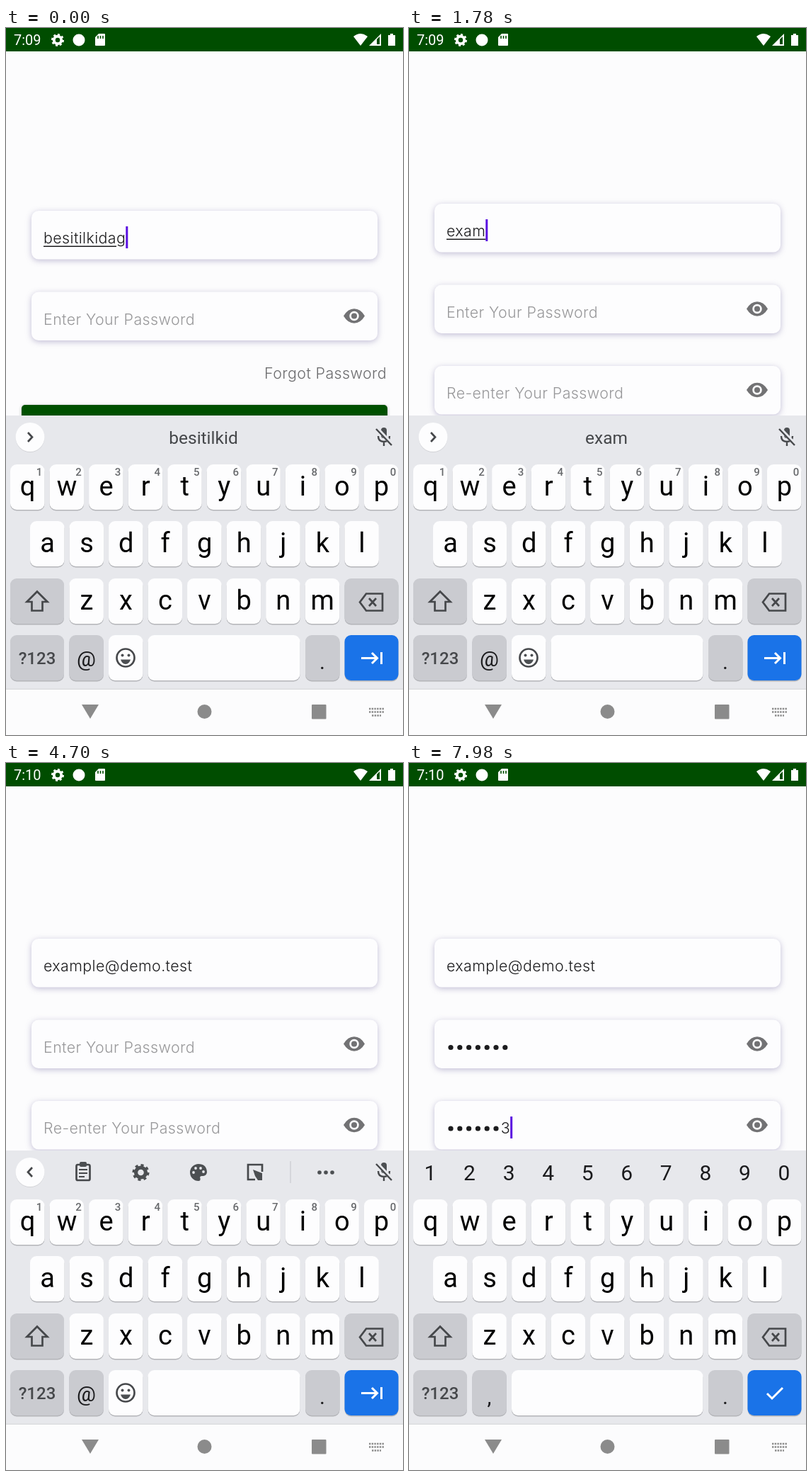
Write an HTML page that moves like this. It is 561 by 998 pixels and loops after 8000 ms.

```html
<!DOCTYPE html>
<html lang="en">
<head>
<meta charset="utf-8">
<title>Sign up form</title>
<style>
  html, body { margin: 0; width: 100%; height: 100%; overflow: hidden; background: #fcfcfd; }
  svg { display: block; width: 100vw; height: 100vh; }
  text { white-space: pre; }
  .body { font: 350 21.4px Inter, sans-serif; letter-spacing: .4px; fill: #6c6c6e; }
  .hint { fill: #98989a; }
  .typed { fill: #1c1c1e; }
  .link { font: 600 21.8px Inter, sans-serif; fill: #004d00; }
  .label { font: 400 19.1px Inter, sans-serif; letter-spacing: 1.7px; fill: #fff; }
  .mid { text-anchor: middle; }
  .end { text-anchor: end; }
  .field { fill: #fdfdfe; filter: drop-shadow(0 2px 4px rgba(70, 60, 130, .32)); }
  .button { fill: #005000; filter: drop-shadow(0 1px 2px rgba(0, 0, 0, .3)); }
  .status { font: 400 20px Roboto, sans-serif; fill: #fff; }
  #board text { font-family: Roboto, sans-serif; text-anchor: middle; }
  .letter { font-size: 38px; }
  .corner { font-size: 15px; font-weight: 500; fill: #66686b; }
  .digit { font-size: 30px; fill: #1b1b1d; }
  .word { font-size: 24.5px; fill: #45474a; }
  .mode { font-size: 24px; font-weight: 500; fill: #46484b; }
  .line { fill: none; stroke: #46484b; stroke-width: 2.7; }
  .white { stroke: #fff; stroke-width: 3; }
  .ink { fill: #4c4f52; }
</style>
</head>
<body>
<svg id="stage" viewBox="0 0 561 998" preserveAspectRatio="none"></svg>
<script>
const LOOP = 8000, CUT = 100, SIGN_UP = 620, FOCUS = 1100, RISE = 1140, RISE_TIME = 285;
const MINUTE = 3600, PASS = 5000, REPEAT = 6850;
const TEXT_X = 53, DOT_PITCH = 12.8, BOARD_H = 386;
const USER = 'besitilkidag', NAME = 'example', HOST = '@demo.test', SECRET = 'pass123';

const text = (x, y, cls, s, id = '') =>
  `<text x="${x}" y="${y}" class="${cls}"${id && ` id="${id}"`}>${s}</text>`;
const rect = (x, y, w, h, r, attrs) =>
  `<rect x="${x}" y="${y}" width="${w}" height="${h}" rx="${r}" ${attrs}/>`;
const circle = (x, y, r, attrs) => `<circle cx="${x}" cy="${y}" r="${r}" ${attrs}/>`;
const path = (d, attrs) => `<path d="${d}" ${attrs}/>`;

function gear(x, y, r, color) {
  const ring = (k, w, extra) =>
    circle(x, y, r * k, `fill="none" stroke="${color}" stroke-width="${r * w}" ${extra}`);
  return ring(.58, .44, '') + ring(.85, .3, 'pathLength="16" stroke-dasharray="1 1"');
}

const eye = (x, y) => path(`M${x - 15} ${y}Q${x - 9} ${y - 10.2} ${x} ${y - 10.2}T${x + 15} ${y}Q${x + 9} ${y + 10.2} ${x} ${y + 10.2}T${x - 15} ${y}Z`, 'fill="#727274"')
  + circle(x, y, 5.4, 'fill="#727274" stroke="#fdfdfe" stroke-width="2.7"');

const field = (y, hint, id, secret) =>
  rect(36, y, 489, 68.5, 10, 'class="field"')
  + text(TEXT_X, y + 46, 'body hint', hint, id + 'Hint')
  + `<g id="${id}Dots"></g>` + text(TEXT_X, y + 46, 'body typed', '', id)
  + (secret ? eye(492, y + 34) : '');

const button = (y, label) =>
  rect(22, y, 517, 50, 5, 'class="button"') + text(281, y + 32.5, 'label mid', label);

const login = `<g id="login">
  ${field(258, 'Enter Your Email', 'user')}
  ${field(372.5, 'Enter Your Password', 'loginPass', true)}
  ${text(538, 495, 'body end', 'Forgot Password')}
  ${button(532, 'Sign In')}
  ${text(280.5, 656, 'body mid', 'Not Registered Yet?')}
  ${text(280.5, 698, 'link mid', 'Sign Up')}</g>`;

const register = `<g id="register">
  ${field(248, 'Enter Your Email', 'email')}
  ${field(362.5, 'Enter Your Password', 'pass', true)}
  ${field(477, 'Re-enter Your Password', 'repeat', true)}
  ${button(583.5, 'Sign Up')}
  ${text(280.5, 687, 'body mid', 'Already Registered?')}
  ${text(280.5, 729, 'link mid', 'Sign In')}</g>`;

const statusBar = rect(0, 0, 561, 33, 0, 'fill="#004d00"')
  + text(11, 24, 'status', '7:09', 'clock')
  + gear(73, 17, 9, '#fff') + circle(103, 17, 8.5, 'fill="#fff"')
  + path('M131 8H139Q140 8 140 9V24Q140 25 139 25H127Q126 25 126 24V13Z', 'fill="#fff"')
  + path('M130 11V15M133.5 11V15M137 11V15', 'stroke="#004d00" stroke-width="1.6"')
  + path('M491 12Q501 4 511 12L501 25Z', 'fill="#fff"')
  + path('M513 25L530 8V25Z', 'fill="#fff"')
  + path('M524 23V16L528 12V23Z', 'fill="#004d00"')
  + path('M540 10H543V8H547V10H550V25H540Z', 'fill="#fff"');

const key = (x, y, w, color = '#fdfdfe') =>
  rect(x, y + 1.5, w, 64, 9, 'fill="#b4b5b9"') + rect(x, y, w, 64, 9, `fill="${color}"`);
const GREY = '#cacbd0', STEP = 55.55, KEY_W = 48.5;

const row = (letters, x, y) => [...letters].map((c, i) =>
  key(x + STEP * i, y, KEY_W) + text(x + STEP * i + 24.5, y + 43.5, 'letter', c)).join('');
const digits = (cls, x, y) => [...'1234567890'].map((c, i) =>
  text(x + STEP * i, y, cls, c)).join('');

const tools = path('M37 571L31 577.5L37 584', 'class="line"')
  + rect(99.5, 567, 19, 22, 2, 'class="line"') + rect(104, 563, 10, 7, 2, 'class="ink"')
  + path('M103 574H115M103 579H115M103 584H111', 'class="line" style="stroke-width:2"')
  + gear(190.5, 578, 12, '#4c4f52')
  + path('M272 566A12 12 0 1 0 272 590Q275 590 274.500 586.500Q273 583 277 583H279Q284 582 284 577Q283 566 272 566Z', 'class="ink"')
  + [[265, 578], [268, 572], [275, 572], [279, 577]].map(p => circle(...p, 1.9, 'fill="#e7e8ec"')).join('')
  + path('M352 588H342V567H362V577', 'class="line"')
  + path('M349 574L362 579V589H356L352 583Z', 'class="ink"')
  + path('M402 562V593', 'stroke="#cfd0d6" stroke-width="1.5"')
  + [443, 452, 461].map(x => circle(x, 578, 2.8, 'class="ink"')).join('');

const mic = rect(530, 564, 8, 15, 4, 'class="ink"')
  + path('M526 576Q526 584 534 584T542 576M534 584V590', 'class="line" style="stroke-width:2.4"')
  + path('M524 565L546 588', 'stroke="#e7e8ec" stroke-width="5"')
  + path('M523 566L545 589', 'class="line" style="stroke-width:2.4"');

const board = `<g id="board">
  ${rect(0, 547, 561, 840, 0, 'fill="#e7e8ec"')}
  ${rect(0, 933, 561, 460, 0, 'fill="#fcfcfd"')}
  ${rect(0, 932.500, 561, 1.5, 0, 'fill="#dcdde0"')}
  <g id="strip">${circle(34, 578.5, 20.5, 'fill="#d3d4d8"')}${circle(34, 577.5, 20.5, 'fill="#fdfdfe"')}${mic}
    <g id="tools">${tools}</g>
    <g id="suggest">${path('M31 571L37 577.5L31 584', 'class="line"')}${text(279, 587, 'word', '', 'word')}</g></g>
  ${row('qwertyuiop', 6, 616)}${row('asdfghjkl', 34, 696)}${row('zxcvbnm', 89.4, 777)}
  ${key(6, 777, 76, GREY)}${path('M44 795.5L58.500 810H51.500V822.500H36.500V810H29.500Z', 'class="line"')}
  ${key(478.5, 777, 76, GREY)}${path('M509 798.500H532V822.500H509L500 810.500Z M513 805L523 816M523 805L513 816', 'class="line"')}
  ${key(6, 857, 76, GREY)}${text(44, 898, 'mode', '?123')}
  ${key(89.4, 857, KEY_W, GREY)}${key(423, 857, KEY_W, GREY)}${text(447, 905, 'digit', '.')}
  ${key(478.5, 857, 76, '#1a73e8')}
  ${path('M502 889.500H524M517 882L524.500 889.500L517 897M530.500 881V898', 'class="line white" id="next"')}
  ${path('M506 890L513 897L528 882', 'class="line white" id="done"')}
  <g id="mailKeys">${digits('corner', 47, 632)}${text(113.5, 901, 'digit', '@')}
    ${key(145, 857, KEY_W)}${circle(169, 889, 12.5, 'class="line"')}
    ${circle(164.5, 885.5, 2, 'class="ink"')}${circle(173.5, 885.5, 2, 'class="ink"')}
    ${path('M162 891.500H176Q174 898 169 898T162 891.500Z', 'class="ink"')}
    ${key(200.5, 857, 215)}</g>
  <g id="passKeys">${digits('digit', 30, 589)}${text(113.5, 905, 'digit', ',')}${key(145, 857, 270.5)}</g>
</g>`;

const navIcons = `<g id="nav">
  <path id="back" d="M107 965L127 953V977Z"/>
  ${circle(280.5, 965, 10, '')}${rect(432, 955, 20.5, 20.5, 1, '')}
  <path id="switcher" d="M513 961H534M513 965.500H534M517 970.500H530" fill="none" stroke-width="2.4" stroke-dasharray="2.4 1.300"/></g>`;

document.getElementById('stage').innerHTML = rect(0, 0, 561, 998, 0, 'fill="#fcfcfd"')
  + login + register + rect(0, 0, 3, 31, 0, 'id="cursor" fill="#5a10e0"')
  + rect(0, 0, 0, 1.5, 0, 'id="underline" fill="#1c1c1e"')
  + rect(0, 933, 561, 65, 0, 'fill="#000"') + board + navIcons + statusBar;

const el = id => document.getElementById(id);
const show = (id, on) => { el(id).style.display = on ? '' : 'none'; };
const put = (id, s) => { if (el(id).textContent !== s) el(id).textContent = s; };
const clamp = v => Math.min(1, Math.max(0, v));
const set = (id, attrs) => { for (const k in attrs) el(id).setAttribute(k, attrs[k]); };

// Cubic bezier (.4, 0, .2, 1), solved by bisection.
function ease(x) {
  let lo = 0, hi = 1;
  for (let i = 0; i < 20; i++) {
    const s = (lo + hi) / 2, r = 1 - s;
    if (1.2 * r * r * s + .6 * r * s * s + s * s * s < x) lo = s; else hi = s;
  }
  return lo * lo * (3 - 2 * lo);
}

function typing(t, s, start, step) {
  const n = Math.min(s.length, Math.max(0, Math.floor((t - start) / step) + 1));
  return { n, value: s.slice(0, n), last: n ? start + (n - 1) * step : 0 };
}

const widthOf = id => el(id).textContent ? el(id).getComputedTextLength() : 0;

function plain(id, value) {
  put(id, value);
  show(id + 'Hint', !value);
  return TEXT_X + widthOf(id);
}

function masked(id, y, state, t, focused) {
  const open = focused && state.n > 0 && t - state.last < 1500;
  const dots = state.n - (open ? 1 : 0);
  const x = TEXT_X + DOT_PITCH * dots;
  el(id + 'Dots').innerHTML = Array.from({ length: dots }, (_, i) =>
    circle(59 + DOT_PITCH * i, y + 39, 3.6, 'fill="#1c1c1e"')).join('');
  set(id, { x });
  put(id, open ? state.value.at(-1) : '');
  show(id + 'Hint', !state.n);
  return x + widthOf(id);
}

function render(t) {
  const typingUser = t < CUT, onLogin = t < SIGN_UP;
  const name = typing(t, NAME, 1500, 83), host = typing(t, HOST, 3000, 111);
  const pass = typing(t, SECRET, 5750, 150), again = typing(t, SECRET, 7050, 150);
  const inPass = t >= PASS && t < REPEAT, inRepeat = t >= REPEAT;

  show('login', onLogin);
  show('register', !onLogin);
  put('clock', t < MINUTE ? '7:09' : '7:10');

  const userEnd = plain('user', typingUser ? USER : '');
  const emailEnd = plain('email', name.value + host.value);
  const passEnd = masked('pass', 362.5, pass, t, inPass);
  const againEnd = masked('repeat', 477, again, t, inRepeat);

  let x = emailEnd, y = 270, since = Math.max(FOCUS, name.last, host.last);
  if (typingUser) [x, y, since] = [userEnd, 280, 0];
  else if (inRepeat) [x, y, since] = [againEnd, 499, Math.max(REPEAT, again.last)];
  else if (inPass) [x, y, since] = [passEnd, 384.5, Math.max(PASS, pass.last)];
  set('cursor', { x, y });
  show('cursor', (typingUser || t >= FOCUS) && (t - since) % 1000 < 500);

  const composing = typingUser || (name.n > 0 && !host.n);
  show('underline', composing);
  if (composing) {
    const end = typingUser ? TEXT_X + el('user').getSubStringLength(0, 11) : emailEnd;
    set('underline', { x: TEXT_X, y: typingUser ? 307.5 : 297.5, width: end - TEXT_X });
  }

  const p = typingUser ? 1 : ease(clamp((t - RISE) / RISE_TIME));
  show('board', p > 0);
  set('board', { transform: `translate(0 ${(1 - p) * BOARD_H})`, opacity: p });
  const secret = inPass || inRepeat;
  show('mailKeys', !secret);
  show('passKeys', secret);
  show('strip', !secret);
  show('tools', !composing);
  show('suggest', composing);
  put('word', typingUser ? USER.slice(0, 10) : name.value);
  show('next', !inRepeat);
  show('done', inRepeat);

  const shade = Math.round(255 - 116 * p), color = `rgb(${shade},${shade},${shade})`;
  set('nav', { fill: color });
  set('switcher', { stroke: color });
  show('switcher', p > 0);
  const turn = typingUser ? 1 : ease(clamp((t - 1290) / 150));
  set('back', { transform: `rotate(${-90 * turn} 118 964)` });
}

const start = performance.now();
function frame() {
  render((performance.now() - start) % LOOP);
  requestAnimationFrame(frame);
}
frame();
</script>
</body>
</html>
```
